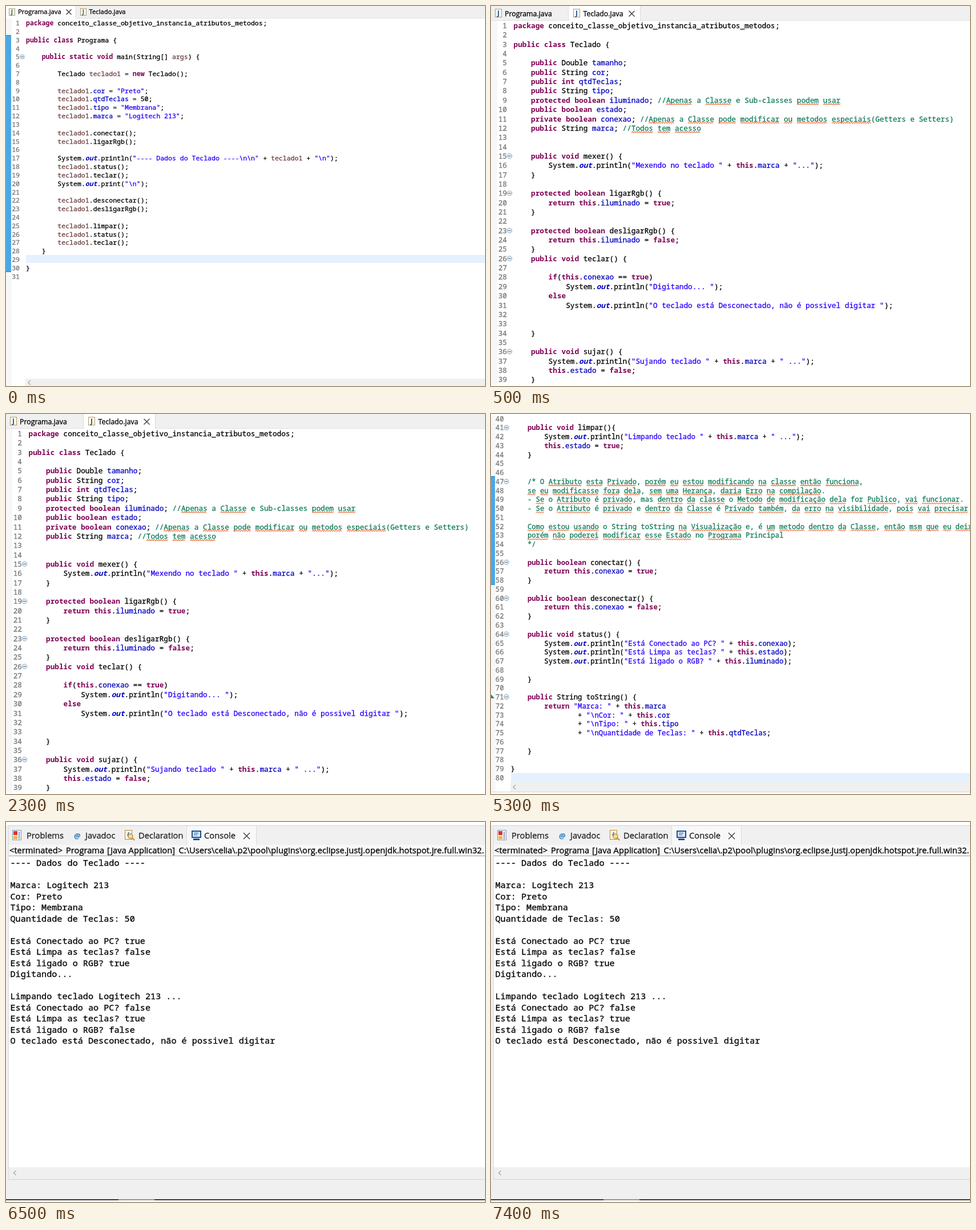
These frames come from a looping animation (839 px wide and 667 px high, 8000 ms). An HTML page with a canvas:

```html
<!DOCTYPE html>
<html lang="pt">
<head>
<meta charset="utf-8">
<title>Teclado</title>
<style>
html, body { margin: 0; width: 100%; height: 100%; overflow: hidden; background: #fff; }
canvas { display: block; }
</style>
</head>
<body>
<canvas id="stage" width="839" height="667"></canvas>
<script>
const W = 839, H = 667;
const ctx = document.getElementById('stage').getContext('2d');
const MONO = '"Noto Sans Mono", "DejaVu Sans Mono", monospace';
const UI = '"Open Sans", "Noto Sans", sans-serif';
const GREY = '#f0f0f0';

const words = list => new Set(list.split(' '));
const KEYWORDS = words('package public class static void new protected private boolean int return this true false if else');
const FIELDS = words('cor qtdTeclas tipo marca tamanho iluminado estado conexao');
const LOCALS = words('teclado1 args');
const SPELLED_OK = words('do mas for no String toString Sub classes Getters Setters Principal');

const programa = String.raw`package conceito_classe_objetivo_instancia_atributos_metodos;

public class Programa {

    public static void main(String[] args) {

        Teclado teclado1 = new Teclado();

        teclado1.cor = "Preto";
        teclado1.qtdTeclas = 50;
        teclado1.tipo = "Membrana";
        teclado1.marca = "Logitech 213";

        teclado1.conectar();
        teclado1.ligarRgb();

        System.out.println("---- Dados do Teclado ----\n\n" + teclado1 + "\n");
        teclado1.status();
        teclado1.teclar();
        System.out.print("\n");

        teclado1.desconectar();
        teclado1.desligarRgb();

        teclado1.limpar();
        teclado1.status();
        teclado1.teclar();
    }

}
`;

const tecladoTop = String.raw`package conceito_classe_objetivo_instancia_atributos_metodos;

public class Teclado {

    public Double tamanho;
    public String cor;
    public int qtdTeclas;
    public String tipo;
    protected boolean iluminado; //Apenas a Classe e Sub-classes podem usar
    public boolean estado;
    private boolean conexao; //Apenas a Classe pode modificar ou metodos especiais(Getters e Setters)
    public String marca; //Todos tem acesso


    public void mexer() {
        System.out.println("Mexendo no teclado " + this.marca + "...");
    }

    protected boolean ligarRgb() {
        return this.iluminado = true;
    }

    protected boolean desligarRgb() {
        return this.iluminado = false;
    }
    public void teclar() {

        if(this.conexao == true)
            System.out.println("Digitando... ");
        else
            System.out.println("O teclado está Desconectado, não é possivel digitar ");


    }

    public void sujar() {
        System.out.println("Sujando teclado " + this.marca + " ...");
        this.estado = false;
    }`;

const tecladoEnd = String.raw`
    public void limpar(){
        System.out.println("Limpando teclado " + this.marca + " ...");
        this.estado = true;
    }


    /* O Atributo esta Privado, porém eu estou modificando na classe então funciona,
    se eu modificasse fora dela, sem uma Herança, daria Erro na compilação.
    - Se o Atributo é privado, mas dentro da classe o Metodo de modificação dela for Publico, vai funcionar.
    - Se o Atributo é privado e dentro da Classe é Privado também, da erro na visibilidade, pois vai precisar

    Como estou usando o String toString na Visualização e, é um metodo dentro da Classe, então msm que eu deixe
    porém não poderei modificar esse Estado no Programa Principal
    */

    public boolean conectar() {
        return this.conexao = true;
    }

    public boolean desconectar() {
        return this.conexao = false;
    }

    public void status() {
        System.out.println("Está Conectado ao PC? " + this.conexao);
        System.out.println("Está Limpa as teclas? " + this.estado);
        System.out.println("Está ligado o RGB? " + this.iluminado);

    }

    public String toString() {
        return "Marca: " + this.marca
                + "\nCor: " + this.cor
                + "\nTipo: " + this.tipo
                + "\nQuantidade de Teclas: " + this.qtdTeclas;

    }

}
`;

const output = `---- Dados do Teclado ----

Marca: Logitech 213
Cor: Preto
Tipo: Membrana
Quantidade de Teclas: 50

Está Conectado ao PC? true
Está Limpa as teclas? false
Está ligado o RGB? true
Digitando...

Limpando teclado Logitech 213 ...
Está Conectado ao PC? false
Está Limpa as teclas? true
Está ligado o RGB? false
O teclado está Desconectado, não é possivel digitar`;

function rect(x, y, w, h, color) {
  ctx.fillStyle = color;
  ctx.fillRect(x, y, w, h);
}

function stroke(points, color, width = 1) {
  ctx.beginPath();
  points.forEach(([x, y]) => ctx.lineTo(x, y));
  ctx.strokeStyle = color;
  ctx.lineWidth = width;
  ctx.stroke();
}

function frame(x, y, w, h, fill, line) {
  rect(x, y, w, h, fill);
  ctx.strokeStyle = line;
  ctx.lineWidth = 1;
  ctx.strokeRect(x + 0.5, y + 0.5, w - 1, h - 1);
}

// Regular weights get a hairline outline, for the dark look of hinted screen text.
function text(str, x, y, font, color = '#000', align = 'left') {
  ctx.font = font;
  ctx.fillStyle = ctx.strokeStyle = color;
  ctx.textAlign = align;
  ctx.fillText(str, x, y);
  if (font.includes('bold')) return;
  ctx.lineWidth = 0.3;
  ctx.strokeText(str, x, y);
}

const label = (str, x, y, size, color) => text(str, x, y, `${size}px ${UI}`, color);

function cross(x, y, r) {
  stroke([[x - r, y - r], [x + r, y + r]], '#333', 1.2);
  stroke([[x + r, y - r], [x - r, y + r]], '#333', 1.2);
}

function scrollArrow(x, y) {
  stroke([[x + 2, y - 4], [x - 2, y], [x + 2, y + 4]], '#a8a8a8', 1.4);
}

function javaFile(x, y, w, h) {
  frame(x, y, w, h, '#fdfbf0', '#b59a62');
  text('J', x + w / 2, y + h - 3, `bold ${h - 3}px ${UI}`, '#1c5a94', 'center');
}

function squiggle(x1, x2, y) {
  const points = [];
  for (let x = x1, up = 0; x <= x2; x += 2, up ^= 1) points.push([x, y - up * 2]);
  stroke(points, '#ee7a4c', 1.1);
}

function styleOf(token) {
  if (/^\/[/*]/.test(token)) return ['#0f7a58', ''];
  if (token[0] === '"') return ['#2a00ff', ''];
  if (KEYWORDS.has(token)) return ['#7f0055', 'bold '];
  if (token === 'out') return ['#0000c0', 'italic bold '];
  if (FIELDS.has(token)) return ['#0000c0', ''];
  if (LOCALS.has(token)) return ['#6a3e3e', ''];
  return ['#000', ''];
}

function drawCode(source, { x, y, advance, leading }) {
  const size = advance / 0.6;
  const tokens = source.match(/\/\*[^]*?\*\/|\/\/.*|"[^"]*"|\w+|\s+|[^\w\s]/g);
  let row = 0, col = 0;
  for (const token of tokens) {
    const [color, weight] = styleOf(token);
    const comment = /^\/[/*]/.test(token);
    token.split('\n').forEach((part, i) => {
      if (i) { row++; col = 0; }
      const left = x + col * advance, base = y + row * leading;
      if (part.trim()) text(part, left, base, `${weight}${size}px ${MONO}`, color);
      if (comment) {
        for (const m of part.matchAll(/[\p{L}]{2,}/gu)) {
          if (SPELLED_OK.has(m[0])) continue;
          const start = left + m.index * advance;
          squiggle(start, start + m[0].length * advance, base + 3.5);
        }
      }
      col += part.length;
    });
  }
}

function drawNumbers(first, last, folds, right, foldX, { y, advance, leading }) {
  const size = advance / 0.6;
  for (let n = first; n <= last; n++) {
    const base = y + (n - first) * leading;
    text(n, right, base, `${size}px ${MONO}`, '#787878', 'right');
    if (!folds.includes(n)) continue;
    const cy = base - size * 0.36, r = size * 0.33;
    ctx.beginPath();
    ctx.arc(foldX, cy, r, 0, 7);
    ctx.fillStyle = '#eaf1f7';
    ctx.fill();
    ctx.strokeStyle = '#8ea6b8';
    ctx.lineWidth = 1;
    ctx.stroke();
    stroke([[foldX - r + 1.5, cy], [foldX + r - 1.5, cy]], '#4c6f8c', 1.1);
  }
}

function changeBar(w, top, bottom) {
  rect(0, top, w, bottom - top, '#8fd0f5');
  ctx.save();
  ctx.beginPath();
  ctx.rect(0, top, w, bottom - top);
  ctx.clip();
  for (let y = top - w; y < bottom; y += 3) stroke([[0, y], [w, y + w]], '#1488dc', 1.2);
  ctx.restore();
  rect(0, top, w, 1, '#1488dc');
  rect(0, bottom - 1, w, 1, '#1488dc');
}

function showPrograma() {
  const layout = { x: 35, y: 34.1, advance: 6.92, leading: 14.82 };
  rect(0, 0, W, 22, GREY);
  rect(0, 0, 122, 22, '#fff');
  rect(122, 0, 1, 22, '#dcdcdc');
  rect(122, 21, W, 1, '#e2e2e2');
  javaFile(5, 4, 11, 13);
  label('Programa.java', 21, 14, 11.3);
  cross(110, 10.5, 4.5);
  javaFile(130, 4, 11, 13);
  label('Teclado.java', 145.5, 14, 11.3);
  rect(0, 22, 10, H - 22, '#f7f7f7');
  changeBar(9, 51, 467);
  rect(35, 437, W, 14, '#e5f1fe');
  drawNumbers(1, 31, [5], 24, 28.5, layout);
  drawCode(programa, layout);
  rect(34, 654, W, 13, GREY);
  scrollArrow(41, 661);
}

function showTecladoTop() {
  const layout = { x: 39.5, y: 39, advance: 7.64, leading: 16.35 };
  rect(0, 0, W, 26, GREY);
  rect(135, 0, 127, 26, '#fff');
  rect(135, 0, 1, 26, '#dcdcdc');
  rect(261, 0, 1, 26, '#dcdcdc');
  rect(0, 25, 135, 1, '#e2e2e2');
  rect(262, 25, W, 1, '#e2e2e2');
  javaFile(7, 5, 12, 15);
  label('Programa.java', 24, 17.5, 12.35);
  javaFile(144, 5, 12, 15);
  label('Teclado.java', 161.5, 17.5, 12.35);
  cross(246.5, 13.5, 5);
  rect(0, 26, 11, 639, '#f7f7f7');
  drawNumbers(1, 39, [15, 19, 23, 26, 36], 28, 32.5, layout);
  drawCode(tecladoTop, layout);
}

function showTecladoEnd() {
  const layout = { x: 34.5, y: 12.6, advance: 7.35, leading: 15.756 };
  rect(0, 4, 8, 660, '#f7f7f7');
  changeBar(7, 109, 300);
  ctx.beginPath();
  ctx.moveTo(0, 492);
  ctx.lineTo(6, 499);
  ctx.lineTo(0, 499);
  ctx.fillStyle = '#1f8a48';
  ctx.fill();
  rect(35, 630, W, 16, '#e5f1fe');
  drawNumbers(40, 80, [41, 47, 56, 60, 64, 71], 22.5, 27, layout);
  drawCode(tecladoEnd, layout);
  rect(34, 646, W, 18, GREY);
  scrollArrow(41, 655);
  rect(0, 663, W, 1, '#d4d4d4');
}

function viewIcons() {
  frame(11, 14, 16, 18, '#f4f6fb', '#8794ad');
  rect(13, 16, 7, 7, '#d9323c');
  rect(13, 25, 7, 5, '#e9b63c');
  rect(22, 17, 2, 13, '#8fa5c8');

  text('@', 124.5, 29, `italic bold 13px ${UI}`, '#1f74b8', 'center');

  frame(208, 14, 13, 17, '#fdf6e2', '#b98a35');
  text('{', 212, 26, `bold 11px ${UI}`, '#2b5f9c');
  ctx.beginPath();
  ctx.arc(218, 25, 4, 0, 7);
  ctx.fillStyle = '#f5dd9c';
  ctx.fill();
  ctx.strokeStyle = '#b98a35';
  ctx.lineWidth = 1.3;
  ctx.stroke();
  stroke([[221, 28], [225, 32]], '#c58a25', 2.2);

  rect(325, 15, 17, 13, '#1d4f91');
  rect(327, 17, 13, 9, '#d8e8f8');
  rect(329, 19, 8, 1, '#1d4f91');
  rect(329, 22, 6, 1, '#1d4f91');
  rect(328, 29, 11, 3, '#1d4f91');
}

function showConsole() {
  rect(0, 5, W, 657, GREY);
  rect(4, 6, W, 1, '#dadada');
  rect(4, 6, 1, 622, '#dadada');
  rect(316, 7, 122, 33, '#f8f8f8');
  rect(316, 7, 1, 33, '#dadada');
  rect(438, 7, 1, 33, '#dadada');
  rect(5, 40, W, 19, '#f8f8f8');
  rect(5, 59, W, 1, '#a0a0a0');
  rect(5, 60, W, 546, '#fff');
  rect(4, 627, W, 1, '#d4d4d4');
  scrollArrow(15.5, 616);
  viewIcons();

  [['Problems', 36], ['Javadoc', 139], ['Declaration', 232], ['Console', 347]]
    .forEach(([name, x]) => label(name, x, 29, 14.7, '#222'));
  cross(421.5, 24.5, 5.5);

  [['<terminated>', 6], ['Programa', 105], ['[Java Application]', 177],
   [String.raw`C:\Users\celia\.p2\pool\plugins\org.eclipse.justj.openjdk.hotspot.jre.full.win32.`, 302.5]]
    .forEach(([part, x]) => label(part, x, 55, 14.7));

  output.split('\n').forEach((line, i) =>
    text(line, 7.5, 77.2 + i * 19.5, `${9.1 / 0.6}px ${MONO}`));

  rect(0, 662, W, 2, '#2c403a');
  rect(197, 662, 63, 2, '#8d9894');
}

const LOOP = 8000;
const scenes = [[6500, showConsole], [3500, showTecladoEnd], [500, showTecladoTop], [0, showPrograma]];
let current = null;

function tick() {
  const time = performance.now() % LOOP;
  const scene = scenes.find(([start]) => time >= start)[1];
  if (scene !== current) {
    current = scene;
    rect(0, 0, W, H, '#fff');
    scene();
  }
  requestAnimationFrame(tick);
}
tick();
</script>
</body>
</html>
```
